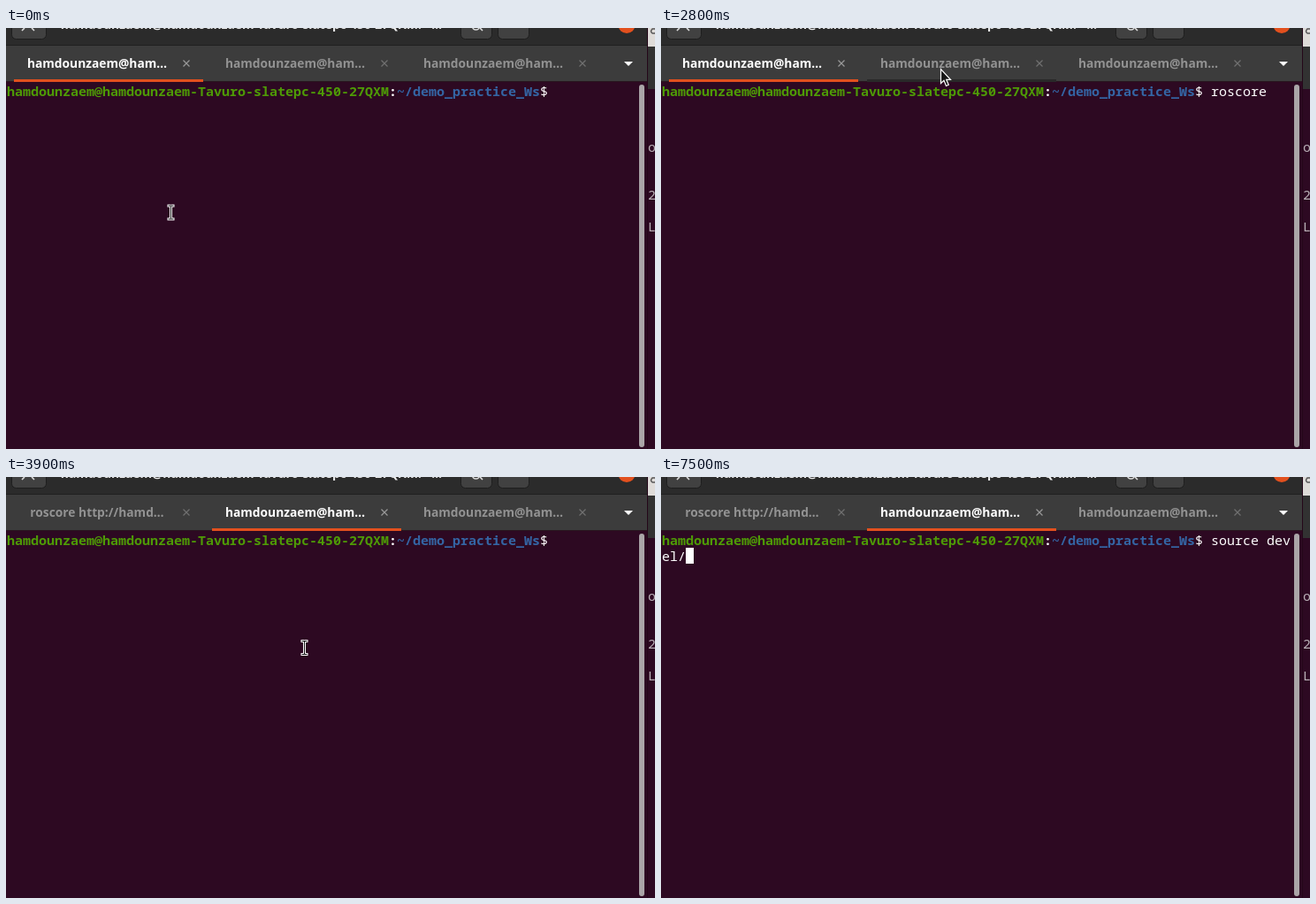
Write an HTML page that moves like this. It is 734x476 px and loops after 8000 ms.

```html
<!DOCTYPE html>
<html lang="en">
<head>
<meta charset="utf-8">
<title>Terminal</title>
<style>
  html, body { margin: 0; width: 100%; height: 100%; overflow: hidden; background: #2d0922; }
  svg { display: block; }
  text { white-space: pre; }
  .ui { font: bold 13.8px "Open Sans", "Noto Sans", sans-serif; text-anchor: middle; fill: #929292; }
  .mono { font: 15px "Noto Sans Mono", "Liberation Mono", monospace; fill: #fff; }
  .bold { font-weight: bold; }
  .button { fill: #414141; stroke: #1e1e1e; }
  .pointer path { fill: none; stroke: #fff; stroke-width: 3; }
  .pointer path + path { stroke: #111; stroke-width: 1; }
</style>
</head>
<body>
<svg id="stage" width="734" height="476" viewBox="0 0 734 476">
  <rect width="734" height="476" fill="#2d0922"/>

  <!-- window behind, at the right edge -->
  <rect x="726" width="8" height="21" fill="#dedbd8"/>
  <path d="M734 1h-3q-3 3 0 5h3" fill="none" stroke="#555" stroke-width="1.5"/>
  <rect x="726" y="21" width="8" height="48" fill="#323232"/>
  <g class="mono" style="fill:#b9b0b6">
    <text x="726" y="140">o</text><text x="726" y="194">2</text><text x="726" y="230">L</text>
  </g>

  <!-- header bar -->
  <rect width="725" height="20" fill="#2b2b2b"/>
  <rect class="button" x="6.5" y="-20" width="39" height="32.5" rx="5"/>
  <rect class="button" x="514.5" y="-20" width="35" height="32.5" rx="5"/>
  <rect class="button" x="556.5" y="-20" width="35" height="32.5" rx="5"/>
  <path d="M18 3l3-3M32 3l-3-3M536 0l3 3" stroke="#ddd" stroke-width="1.6"/>
  <circle cx="531.5" cy="-2" r="4" fill="none" stroke="#ddd" stroke-width="1.6"/>
  <circle cx="702" cy="-3.5" r="9.5" fill="#e2501e"/>
  <text id="title" class="ui" x="277.5" y="1" style="fill:#eee"></text>

  <!-- tab bar -->
  <rect y="19" width="725" height="1" fill="#202020"/>
  <rect y="20" width="725" height="40.5" fill="#3c3c3c"/>
  <rect y="60" width="725" height="1" fill="#29151f"/>
  <g id="tabs"></g>
  <path d="M699 38h10l-5 5z" fill="#fff"/>

  <!-- terminal -->
  <rect x="725" width="1" height="476" fill="#240719"/>
  <rect x="716" y="64" width="6" height="410" rx="3" fill="#aaa5a8"/>
  <g id="prompt" class="mono"></g>
  <g id="lines" class="mono"></g>
  <rect id="caret" width="9" height="18" fill="#fff"/>

  <!-- mouse pointers -->
  <g id="beam" class="pointer">
    <path d="M-4 -7.5H-1Q0 -7.5 0 -6.5V6.5Q0 7.5 -1 7.5H-4M4 -7.5H1Q0 -7.5 0 -6.5V6.5Q0 7.5 1 7.5H4"/>
    <path d="M-3 -7.5H3M0 -7V7M-3 7.5H3"/>
  </g>
  <path id="arrow" d="M.5 .5V16.5L4 13.2L6.5 19.5L9.3 18.3L6.7 12.3H11.5Z"
    fill="#151515" stroke="#fff" stroke-width="1.2"/>
</svg>
<script>
const LOOP = 8000, COLS = 79, CELL = 9, ROW = 18, PROMPT = 69;
const user = 'hamdounzaem', host = user + '-Tavuro-slatepc-450-27QXM';
const prompt = `${user}@${host}`;
const shortName = `${user}@${user.slice(0, 3)}…`;
const $ = id => document.getElementById(id);

const output = [
  ...wrap(`... logging to /home/${user}/.ros/log/7d3e52ba-61c4-11ec-9b0f-4f8a2c6d17e5/roslaunch-${host}-6148.log`),
  'Checking log directory for disk usage. This may take a while.',
  'Press Ctrl-C to interrupt',
  'Done checking log file disk usage. Usage is <1GB.',
];

// Tracks hold [start time, value]; each value stays until the next.
const typed = [[0, 0], [500, 1], [600, 2], [700, 3], [1200, 4], [1400, 5], [1500, 6], [1700, 7],
  [3200, 0], [5000, 1], [5100, 2], [5200, 3], [5300, 4], [5800, 5], [6000, 6],
  [6500, 7], [6600, 8], [6800, 9], [7100, 10], [7200, 11], [7500, 13]];
const caretOn = [[0, false], [300, true], [2400, false], [3000, true], [3800, false], [4400, true]];
const mouse = [[0, ['beam', 186.5, 208.5]], [400, null], [2300, ['beam', 186.5, 208.5]],
  [2400, ['beam', 238, 184]], [2500, ['beam', 303.5, 132]], [2700, ['beam', 316, 72]],
  [2800, ['arrow', 316, 46]], [2900, ['arrow', 316, 43]], [3600, ['beam', 345.5, 70]],
  [3800, ['beam', 341, 132]], [3900, ['beam', 337.5, 193]], [5000, null]];
const firstTab = [[0, shortName], [3000, 'roscore'], [3900, `roscore http://${user.slice(0, 4)}…`]];

function wrap(text) {
  const rows = [];
  for (let i = 0; i < text.length; i += COLS) rows.push(text.slice(i, i + COLS));
  return rows;
}

function at(track, t) {
  let value = track[0][1];
  for (const [start, next] of track) if (t >= start) value = next;
  return value;
}

function add(parent, tag, attrs, text = '') {
  const node = document.createElementNS('http://www.w3.org/2000/svg', tag);
  set(node, attrs);
  node.textContent = text;
  return parent.appendChild(node);
}

function set(node, attrs) {
  for (const name in attrs) node.setAttribute(name, attrs[name]);
}

function write(node, text) {
  if (node.textContent !== text) node.textContent = text;
}

const tabs = [0, 1, 2].map(i => {
  const x = 9 + i * 224, g = $('tabs');
  return {
    line: add(g, 'rect', { x, y: 58, width: 214, height: 3 }),
    label: add(g, 'text', { class: 'ui', x: x + 94, y: 45 }, shortName),
    close: add(g, 'path', { d: `M${x + 191.5} 36.5l7 7m0 -7l-7 7`, 'stroke-width': 1.2 }),
    center: x + 106,
  };
});

[[0, prompt, 'bold', '#4e9a06'], [48, ':', 'bold', '#fff'],
  [49, '~/demo_practice_Ws', 'bold', '#3465a4'], [67, '$', '', '#fff']]
  .forEach(([col, text, cls, fill]) =>
    add($('prompt'), 'text', { class: cls, x: 1 + col * CELL, y: 77, style: `fill:${fill}` }, text));

const lines = Array.from({ length: 8 }, (_, i) =>
  add($('lines'), 'text', { x: i ? 1 : 1 + PROMPT * CELL, y: 77 + i * ROW }));

function draw(t) {
  const active = t < 3200 ? 0 : 1;
  const hovered = t >= 2800 && t < 3200;
  const running = t >= 3000 && t < 3200;

  const name = at(firstTab, t);
  write(tabs[0].label, name);
  set(tabs[0].label, { x: name === 'roscore' ? tabs[0].center : 103 });
  tabs.forEach(({ line, label, close }, i) => {
    const on = i === active;
    set(line, { fill: on ? '#e2501e' : hovered && i === 1 ? '#292929' : 'none' });
    label.style.fill = on ? '#fff' : '#929292';
    set(close, { stroke: on ? '#999' : '#707070' });
  });
  write($('title'), running ? 'roscore' : `${prompt}: ~…`);

  const command = (active ? 'source devel/' : 'roscore').slice(0, at(typed, t));
  const room = COLS - PROMPT;
  const rows = [command.slice(0, room), ...(running ? output : [command.slice(room)])];
  lines.forEach((node, i) => write(node, rows[i] || ''));

  const entered = t >= 1800 && t < 3200;
  const cell = running ? 7 * COLS : entered ? COLS : PROMPT + command.length;
  set($('caret'), {
    x: 1 + cell % COLS * CELL,
    y: 62 + Math.floor(cell / COLS) * ROW,
    visibility: at(caretOn, t) ? 'visible' : 'hidden',
  });

  const [shape, x, y] = at(mouse, t) || [];
  for (const id of ['beam', 'arrow']) {
    set($(id), { visibility: id === shape ? 'visible' : 'hidden' });
    if (id === shape) set($(id), { transform: `translate(${x} ${y})` });
  }
}

const start = performance.now();
function frame() {
  draw((performance.now() - start) % LOOP);
  requestAnimationFrame(frame);
}
frame();
</script>
</body>
</html>
```
